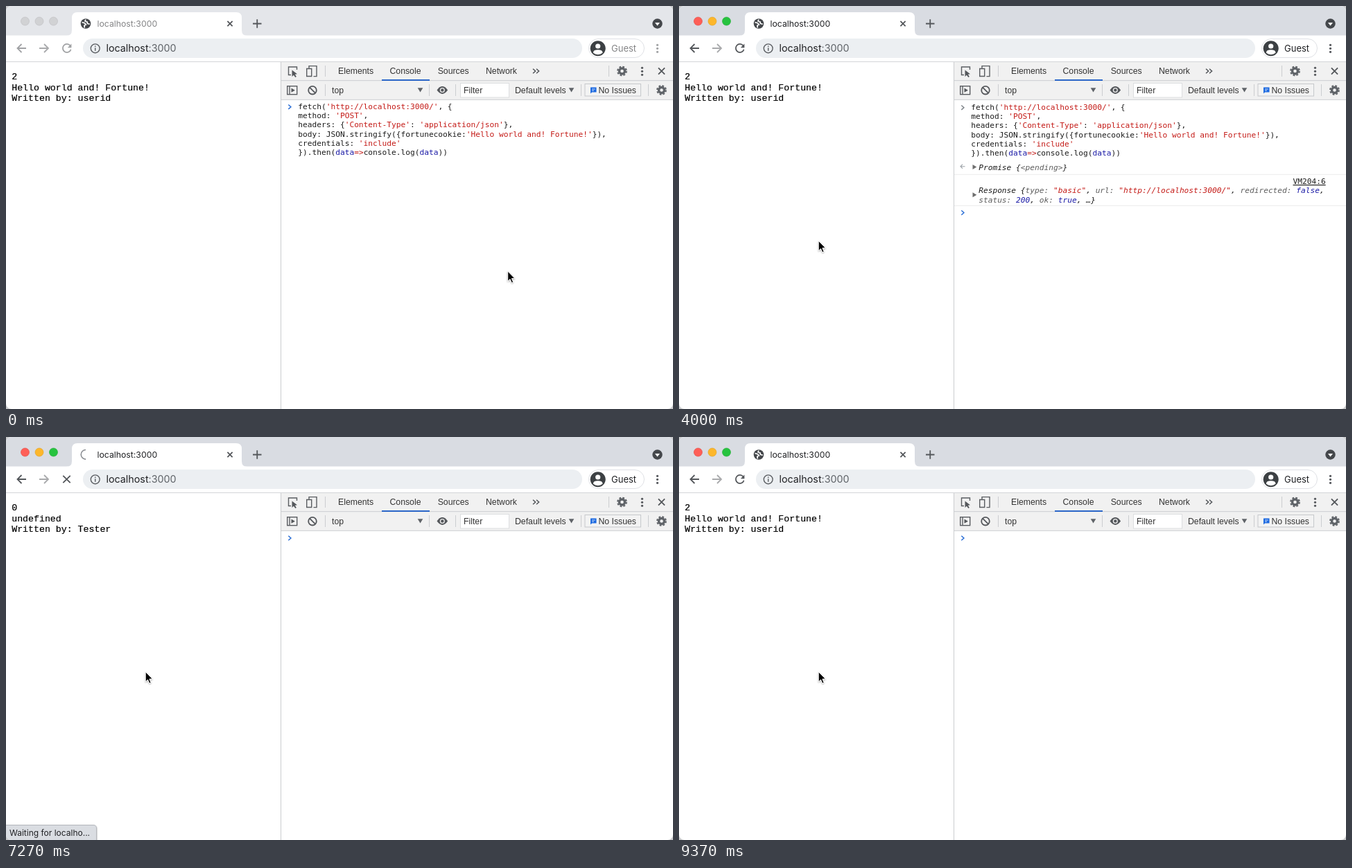
Animation, 962 px wide and 582 px high, one loop 9.63 s. Source, as an HTML page:

```html
<!DOCTYPE html>
<html lang="en">
<head>
<meta charset="utf-8">
<title>Browser console demo</title>
<style>
html, body { margin: 0; width: 100%; height: 100%; overflow: hidden; background: #c9cacc; }
svg { display: block; width: 962px; height: 582px; }
text { white-space: pre; }
.ui { font: 12.25px "Liberation Sans", Arial, sans-serif; fill: #333; }
.sys { font-family: Inter, sans-serif; fill: #202124; }
.code { font: 11.2px "DejaVu Sans Mono", monospace; fill: #1c1c1c; }
.it { font-style: italic; }
.page { font: 13.25px "Liberation Mono", monospace; fill: #000; stroke: #000; stroke-width: .2; }
.str { fill: #c41a16; }
.val { fill: #1a1aa6; }
.key { fill: #5c5c5c; }
.line { fill: none; stroke: #54575b; stroke-width: 1.8; }
.thin { fill: none; stroke: #5a5d61; stroke-width: 1.4; }
.sep { stroke: #cbcdd0; stroke-width: 1; }
#frame { fill: #d9dce2; }
.idle #frame { fill: #e4e6ea; }
.idle .light { fill: #d1d2d4; stroke: #bcbdc0; }
.idle .dim { opacity: .55; }
</style>
</head>
<body>
<svg id="stage" class="idle" viewBox="0 0 962 582"></svg>
<script>
const LOOP = 9630;
const stage = document.getElementById('stage');

const rect = (x, y, w, h, fill, extra = '') =>
  `<rect x="${x}" y="${y}" width="${w}" height="${h}" fill="${fill}" ${extra}/>`;
const circle = (x, y, r, extra) => `<circle cx="${x}" cy="${y}" r="${r}" ${extra}/>`;
const path = (d, extra = 'class="line"') => `<path d="${d}" ${extra}/>`;
const text = (x, y, cls, s, extra = '') => `<text x="${x}" y="${y}" class="${cls}" ${extra}>${s}</text>`;
const group = (id, s, extra = '') => `<g id="${id}" ${extra}>${s}</g>`;
const vline = (x, y1, y2) => path(`M${x} ${y1}V${y2}`, 'class="sep"');
const hline = (y, color) => path(`M397 ${y}H962`, `stroke="${color}"`);
const down = (x, y) => path(`M${x - 3.8} ${y - 3}h7.6l-3.8 6.4z`, 'fill="#5f6368"');
const chevron = (x, y, color) =>
  path(`M${x} ${y - 3.2}l3.6 3.2l-3.6 3.2`, `fill="none" stroke="${color}" stroke-width="1.5"`);
const dots = (x, y, gap, r) =>
  [-1, 0, 1].map(i => circle(x, y + i * gap, r, 'fill="#54575b"')).join('');
const gear = (x, y) =>
  circle(x, y, 6.4, 'fill="none" stroke="#5f6368" stroke-width="2" stroke-dasharray="2.8 2.226"') +
  circle(x, y, 4, 'fill="none" stroke="#5f6368" stroke-width="3.4"');
const cross = (x, y, r) => path(`M${x - r} ${y - r}l${2 * r} ${2 * r}m0 ${-2 * r}l${-2 * r} ${2 * r}`);

// Colours strings, values and property names of one console line.
const esc = s => s.replace(/</g, '&lt;').replace(/>/g, '&gt;');
const paint = s => s.replace(
  /('[^']*'|"[^"]*"|=>)|(\bdata\b|\bfalse\b|\btrue\b|\b200\b)|((?:type|url|redirected|status|ok):|<pending>)/g,
  (m, str, val) => `<tspan class="${str ? 'str' : val ? 'val' : 'key'}">${esc(m)}</tspan>`);
const code = (x, y, s, cls = '') => text(x, y, 'code ' + cls, paint(s));

const request = [
  "fetch('http://localhost:3000/', {",
  "method: 'POST',",
  "headers: {'Content-Type': 'application/json'},",
  "body: JSON.stringify({fortunecookie:'Hello world and! Fortune!'}),",
  "credentials: 'include'",
  "}).then(data=>console.log(data))"
];
const pages = [
  ['0', 'undefined', 'Written by: Tester'],
  ['1', 'Hello! Fortune!', 'Written by: userid'],
  ['2', 'Hello world and! Fortune!', 'Written by: userid']
];

const globe = circle(115, 25.5, 7.3, 'fill="#44474b"') +
  path('M109.5 23.5l4 1.2l1.8 2.3l-2.3 1l.3 3.3M115 19.5l-1 2.2l3 1.2l.5 2.4l3.3 1', 'fill="none" stroke="#fff" stroke-width="1.7"');

const tabStrip =
  [['#fe5f57', '#e2463f'], ['#fdb72b', '#e0a01f'], ['#27c33f', '#1dab31']].map(([fill, edge], i) =>
    circle(27.5 + i * 20.5, 22, 6, `class="light" fill="${fill}" stroke="${edge}" stroke-width=".6"`)).join('') +
  path('M87 43q8 0 8-8V17q0-8 8-8H332q8 0 8 8V35q0 8 8 8z', 'fill="#fff"') +
  group('icon', globe) +
  path('', 'id="spin" fill="none" stroke="#8b8e93" stroke-width="1.6"') +
  text(131.5, 30, 'sys dim', 'localhost:3000', 'font-size="12.25"') +
  cross(323, 25.5, 3.6) + path('M356 25.5h12.5m-6.25 -6.25v12.5') +
  circle(939.5, 25.5, 7.2, 'fill="#44474b"') + path('M936 24h7l-3.5 4.4z', 'fill="#fff"');

const toolbar =
  rect(0, 42.5, 962, 38, '#fff') +
  path('M29 61H16.5m6 -6l-6 6l6 6', 'class="line dim"') +
  path('M48 61H61m-6 -6l6 6l-6 6', 'class="line" opacity=".5"') +
  group('reload', path('M92.6 57.2a6 6 0 1 0 1 5.6') + path('M94.4 54.6v5.6h-5.6z', 'fill="#54575b"'), 'class="dim"') +
  group('stop', cross(87.5, 61, 5.2)) +
  rect(111, 47, 720, 28, '#eceff2', 'rx="14"') +
  circle(128.7, 61.3, 6.4, 'class="thin"') + path('M128.7 60.3v4.4m0 -7.2v1.6', 'class="thin"') +
  text(144.5, 66.2, 'sys', 'localhost<tspan fill="#5f6368">:3000</tspan>', 'font-size="14.3"') +
  rect(840.5, 47.5, 80, 27, '#fff', 'rx="13.5" stroke="#dfe1e5"') +
  circle(853.7, 61.2, 11, 'fill="#3c4043"') + circle(853.7, 58, 3.6, 'fill="#fff"') +
  path('M846.8 67.6q0 -4.4 6.9 -4.4t6.9 4.4q-2.8 2.6 -6.9 2.6t-6.9 -2.6z', 'fill="#fff"') +
  group('guest', text(873, 66.2, 'sys', 'Guest', 'font-size="13"') + dots(939.5, 61.3, 5, 1.6), 'class="dim"') +
  path('M0 80.5H962', 'stroke="#d3d5d8"');

const tools =
  rect(397, 81, 565, 54, '#f1f1f1') + hline(107.7, '#cbcdd0') + hline(135.3, '#cbcdd0') +
  vline(396.5, 81, 582) +
  path('M411 99.5h-3.5v-11.5h12v4', 'class="thin"') + path('M412.5 92.5v9.5l2.4 -2.2l2.4 3.3l1.6 -1.1l-2.2 -3.2l3.3 -.6z', 'fill="#54575b"') +
  path('M437 90v-3.4h11v15h-4.500M433.700 90.500h7v11h-7z', 'class="thin"') +
  vline(460.5, 86, 102) +
  ['Elements', 'Console', 'Sources', 'Network'].map((s, i) =>
    text([479, 553.5, 622.7, 692][i], 98, 'ui', s)).join('') +
  rect(542, 106, 69, 2, '#2b66c9') +
  chevron(760, 94, '#54575b') + chevron(765, 94, '#54575b') +
  vline(869.5, 86, 102) + gear(888.5, 94) + dots(917.5, 94.3, 5, 1.6) + cross(945.5, 94, 4.6) +
  rect(405.7, 115.700, 14, 12, 'none', 'stroke="#5a5d61" stroke-width="1.4"') +
  path('M409 116v12', 'class="thin"') + path('M411.500 118.600v6.200l5.400 -3.100z', 'fill="#54575b"') +
  circle(442, 121.700, 5.800, 'class="line"') + path('M438 117.700l8 8') +
  vline(460.5, 113, 130) + text(470, 125.8, 'ui', 'top') + down(597.5, 121.2) + vline(610.5, 113, 130) +
  path('M621.500 121.500q7.800 -10.800 15.600 0q-7.800 10.800 -15.600 0z', 'fill="#54575b"') +
  circle(629.3, 121.5, 2.9, 'fill="#54575b" stroke="#f1f1f1" stroke-width="1.3"') +
  vline(648.5, 113, 130) + rect(655.5, 111.500, 70, 20.500, '#fff', 'stroke="#dcdee0"') +
  text(660, 126.300, 'ui', 'Filter') + text(734, 125.800, 'ui', 'Default levels') + down(815.5, 121.2) +
  vline(829.5, 113, 130) + rect(835, 112.500, 80.500, 17.500, '#f3f3f3', 'stroke="#c6c8cb"') +
  path('M843 117.500h8.500v7h-6.500l-2 2z', 'fill="#1a68e0"') + path('M845 120h4.700m-4.700 2.200h3', 'stroke="#fff" stroke-width=".8"') +
  text(854.5, 125.800, 'ui', 'No Issues') + vline(926.5, 113, 130) + gear(945.5, 121.5);

const fold = y => path(`M423.500 ${y - 3.500}l5.800 3.500l-5.800 3.500z`, 'fill="#6e6e6e"');
const consoleLog =
  group('input', request.map((s, i) => code(421.3, 150 + i * 13.2, s)).join('')) +
  group('oldMark', chevron(407.3, 146.700, '#80868b')) +
  group('promise',
    path('M409 228.700l-3 3l3 3m-3 -3h6.500', 'fill="none" stroke="#9aa0a6" stroke-width="1.100"') +
    fold(232.500) + code(432.2, 236.800, 'Promise {<pending>}', 'it') + hline(243.300, '#ececec')) +
  group('response',
    text(885.500, 257, 'code', 'VM204:6', 'text-decoration="underline"') + fold(272.700) +
    code(432.2, 270.300, 'Response {type: "basic", url: "http://localhost:3000/", redirected: false,', 'it') +
    code(432.2, 283.600, 'status: 200, ok: true, …}', 'it') + hline(288.300, '#ececec')) +
  group('prompt', chevron(407.3, 0, '#2b6fd6') + rect(421, -7, 1.500, 13, '#000', 'id="caret"'));

stage.innerHTML = `
<defs>
  <clipPath id="round"><rect width="962" height="582" rx="8"/></clipPath>
  <filter id="soft" x="-50%" y="-50%" width="200%" height="200%">
    <feDropShadow dx="0" dy="1" stdDeviation="1.1" flood-opacity=".35"/>
  </filter>
</defs>
<g clip-path="url(#round)">` +
  rect(0, 0, 962, 582, '#fff') + rect(0, 0, 962, 43, '#d9dce2', 'id="frame"') +
  tabStrip + toolbar +
  pages.map((p, i) => group('page' + i, p.map((s, n) => text(8.2, 106.3 + n * 15.3, 'page', s)).join(''))).join('') +
  tools + consoleLog +
  group('status',
    path('M-2 560.500H126q4.500 0 4.500 4.500V584H-2z', 'fill="#dadde2" stroke="#b4b7bc" filter="url(#soft)"') +
    text(5, 576.200, 'sys', 'Waiting for localho...', 'font-size="12"')) +
  '</g>' +
  path('M0 0V14.500L3.300 11.500L5.600 16.800L7.900 15.800L5.700 10.600L10 10.300Z',
    'id="mouse" fill="#000" stroke="#fff" stroke-width="1" stroke-linejoin="round" filter="url(#soft)"');

const el = id => document.getElementById(id);
const show = (id, on) => el(id).setAttribute('visibility', on ? 'visible' : 'hidden');
const clamp = v => Math.max(0, Math.min(1, v));
const ease = v => v * v * (3 - 2 * v);
const between = (t, a, b) => t >= a && t < b;

// Each page reload: start, end, moment the status bubble fades, page that arrives.
const reloads = [
  [4000, 4430, 4700, 1], [5060, 5430, 5700, 1], [6000, 6370, 6630, 1],
  [7000, 7370, 7600, 0], [7870, 8230, 8530, 0], [8670, 9030, 9200, 2]
];
// Pointer legs: start, end, from, to.
const legs = [
  [430, 600, [723.7, 383], [725.500, 385]],
  [1200, 1270, [725.500, 385], [727, 379]],
  [2900, 3300, [727, 379], [201.2, 339]]
];

function pointer(t) {
  const [a, b, from, to] = legs.filter(l => t >= l[0]).pop() || legs[0];
  const k = ease(clamp((t - a) / (b - a)));
  return from.map((v, i) => v + (to[i] - v) * k);
}

function spinner(p) {
  const sweep = (p - 90) * Math.PI / 180, r = 6.800;
  return `M115 ${25.3 - r}A${r} ${r} 0 ${sweep > Math.PI ? 1 : 0} 0 ` +
    `${115 - r * Math.sin(sweep)} ${25.3 - r * Math.cos(sweep)}`;
}

function draw(t) {
  stage.classList.toggle('idle', t < 830);

  let page = 2, loading = false, spin = '', status = 0;
  for (const [start, end, fade, next] of reloads) {
    const p = t - start;
    if (p >= 230) page = next;
    if (between(t, start + 30, end - 30)) {
      loading = true;
      if (p > 95) spin = spinner(p);
    }
    if (between(t, start, fade + 140)) status = clamp((p - 95) / 60) * (1 - clamp((t - fade) / 130));
  }
  pages.forEach((_, i) => show('page' + i, i === page));
  show('icon', !loading);
  show('reload', !loading);
  show('stop', loading);
  el('spin').setAttribute('d', spin);
  el('status').setAttribute('opacity', status);

  const sent = t >= 1470, answered = t >= 1970, cleared = t >= 4230;
  show('input', !cleared);
  el('input').setAttribute('transform', `translate(0 ${sent ? 0 : -1})`);
  show('oldMark', sent && !cleared);
  show('promise', sent && !cleared);
  show('response', answered && !cleared);
  const y = cleared ? 146 : answered ? 298.500 : sent ? 253.500 : 145.700;
  el('prompt').setAttribute('transform', `translate(0 ${y})`);
  show('caret', between(t, 1470, 2030) || between(t, 2570, 3070));

  show('mouse', !between(t, 1500, 2930));
  el('mouse').setAttribute('transform', `translate(${pointer(t)})`);
}

const t0 = performance.now();
function tick() {
  draw((performance.now() - t0) % LOOP);
  requestAnimationFrame(tick);
}
draw(0);
requestAnimationFrame(tick);
</script>
</body>
</html>
```
